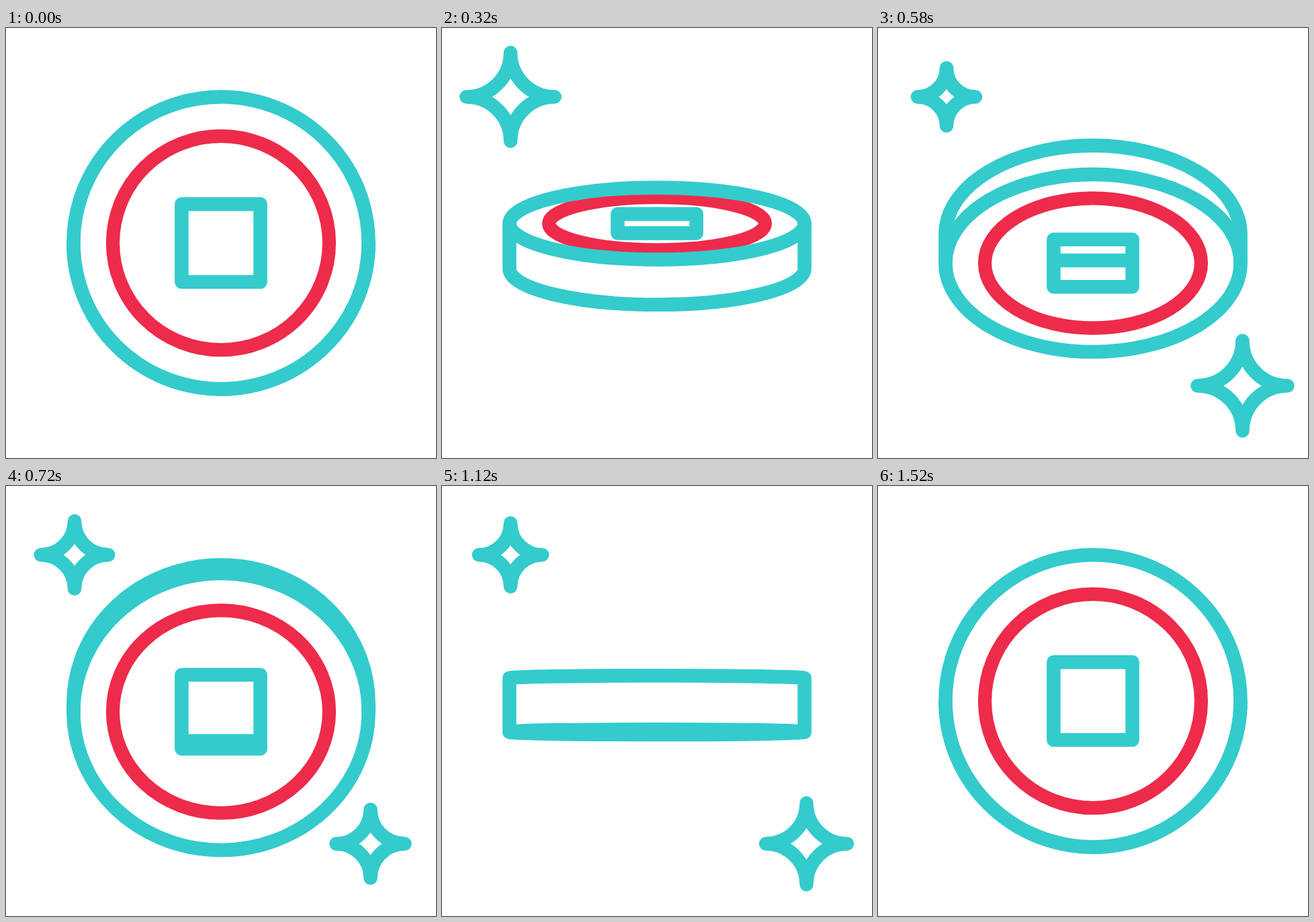
These frames come from a looping animation (640x640 px, 1900 ms). An HTML page:

```html
<!DOCTYPE html>
<html lang="en">
<head>
<meta charset="utf-8">
<title>Spinning coin</title>
<style>
  html, body { margin: 0; width: 100%; height: 100%; overflow: hidden; background: #fff; }
  svg { display: block; width: 100%; height: 100%; }
  .line { fill: none; stroke: #34cbcd; stroke-width: 20.6; stroke-linejoin: round; stroke-linecap: round; }
  #inner { stroke: #ee2b4a; stroke-width: 20.2; }
  #slot { fill: #34cbcd; }
</style>
</head>
<body>
<svg viewBox="0 0 640 640">
  <path id="back" class="line"/>
  <rect id="slot" x="262" width="116"/>
  <path id="hole" class="line"/>
  <path id="inner" class="line"/>
  <path id="outer" class="line"/>
  <path id="star1" class="line"/>
  <path id="star2" class="line"/>
</svg>
<script>
const LOOP = 1900, END = 1520, STEP = 20;
const CX = 320, RX = 219.6, RY = 217.5, DEPTH = 81, HALF = 10.3;
const $ = id => document.getElementById(id);

// Monotone cubic curve through [x, y] points, held flat outside them.
function curve(pts) {
  const n = pts.length - 1;
  const slope = pts.slice(1).map((p, i) => (p[1] - pts[i][1]) / (p[0] - pts[i][0]));
  const tan = pts.map((_, i) => {
    if (i === 0) return slope[0];
    if (i === n) return slope[n - 1];
    const a = slope[i - 1], b = slope[i];
    return a * b <= 0 ? 0 : 2 * a * b / (a + b);
  });
  return x => {
    if (x <= pts[0][0]) return pts[0][1];
    if (x >= pts[n][0]) return pts[n][1];
    let i = 0;
    while (x > pts[i + 1][0]) i++;
    const [x0, y0] = pts[i], [x1, y1] = pts[i + 1];
    const w = x1 - x0, u = (x - x0) / w, v = 1 - u;
    return y0 * v * v * (1 + 2 * u) + y1 * u * u * (3 - 2 * u)
      + w * u * v * (tan[i] * v - tan[i + 1] * u);
  };
}

// Quarter turns of the coin, how flat it looks, and its vertical drift.
const turn = curve([[0, 0], [200, .546], [440, 1.111], [720, 1.846], [960, 2.555], [1280, 3.442], [END, 4]]);
const flat = curve([[0, 0], [.154, .053], [.552, .414], [.889, .834], [1, 1]]);
const drift = curve([[0, 0], [200, 2.75], [440, 6.6], [720, 9.75], [780, 10], [960, 8], [1280, 4], [END, 0]]);

const size1 = curve([[60, 0], [200, 41.5], [290, 66.7], [440, 52.7], [580, 43], [720, 50.2],
  [960, 63.7], [1010, 66.7], [1080, 57.7], [1240, 0]]);
const size2 = curve([[320, 0], [440, 33.4], [540, 65], [565, 67.3], [720, 51], [840, 43], [960, 50.2],
  [1200, 65.2], [1240, 67.3], [1280, 65.7], [1340, 57.7], [1500, 0]]);

function ellipse(id, y, rx, ry) {
  const arc = `a${rx} ${ry} 0 0 1 `;
  $(id).setAttribute("d", `M${CX - rx} ${y}${arc}${2 * rx} 0${arc}${-2 * rx} 0Z`);
}

function star(id, x, y, r) {
  const arc = `A${r} ${r} 0 0 0 `;
  $(id).setAttribute("d", r < 1 ? "" :
    `M${x} ${y - r}${arc}${x + r} ${y}${arc}${x} ${y + r}${arc}${x - r} ${y}${arc}${x} ${y - r}Z`);
}

function draw(t) {
  const q = turn(t);
  const u = Math.abs(q - 2 * Math.round(q / 2));
  const dir = q % 2 < 1 ? -1 : 1;
  const scale = Math.max(1 - flat(u), .002);
  const ry = RY * scale, gap = DEPTH * u;
  const mid = 320 + drift(t);
  const front = mid + dir * gap / 2, rear = mid - dir * gap / 2;

  $("back").setAttribute("d",
    `M${CX - RX} ${front}V${rear}A${RX} ${ry} 0 0 ${dir > 0 ? 1 : 0} ${CX + RX} ${rear}V${front}`);
  ellipse("outer", front, RX, ry);
  ellipse("inner", front, 161, 159.2 * scale);

  const h = 58 * scale;
  $("hole").setAttribute("d", `M261.4 ${front - h}H378.6V${front + h}H261.4Z`);

  // Far edge of the square hole, seen through it.
  const edge = front + dir * (h - gap * (q < 3 ? .91 : 1.02));
  const top = Math.max(edge - HALF, front - h);
  const bottom = Math.min(edge + HALF, front + h);
  $("slot").setAttribute("y", top);
  $("slot").setAttribute("height", Math.max(0, bottom - top));

  star("star1", 102, 102.5, size1(t));
  star("star2", 542.5, 532.5, size2(t));
}

const start = performance.now();
function tick() {
  const t = (performance.now() - start) % LOOP;
  draw(Math.min(END, Math.floor(t / STEP) * STEP));
  requestAnimationFrame(tick);
}
tick();
</script>
</body>
</html>
```
